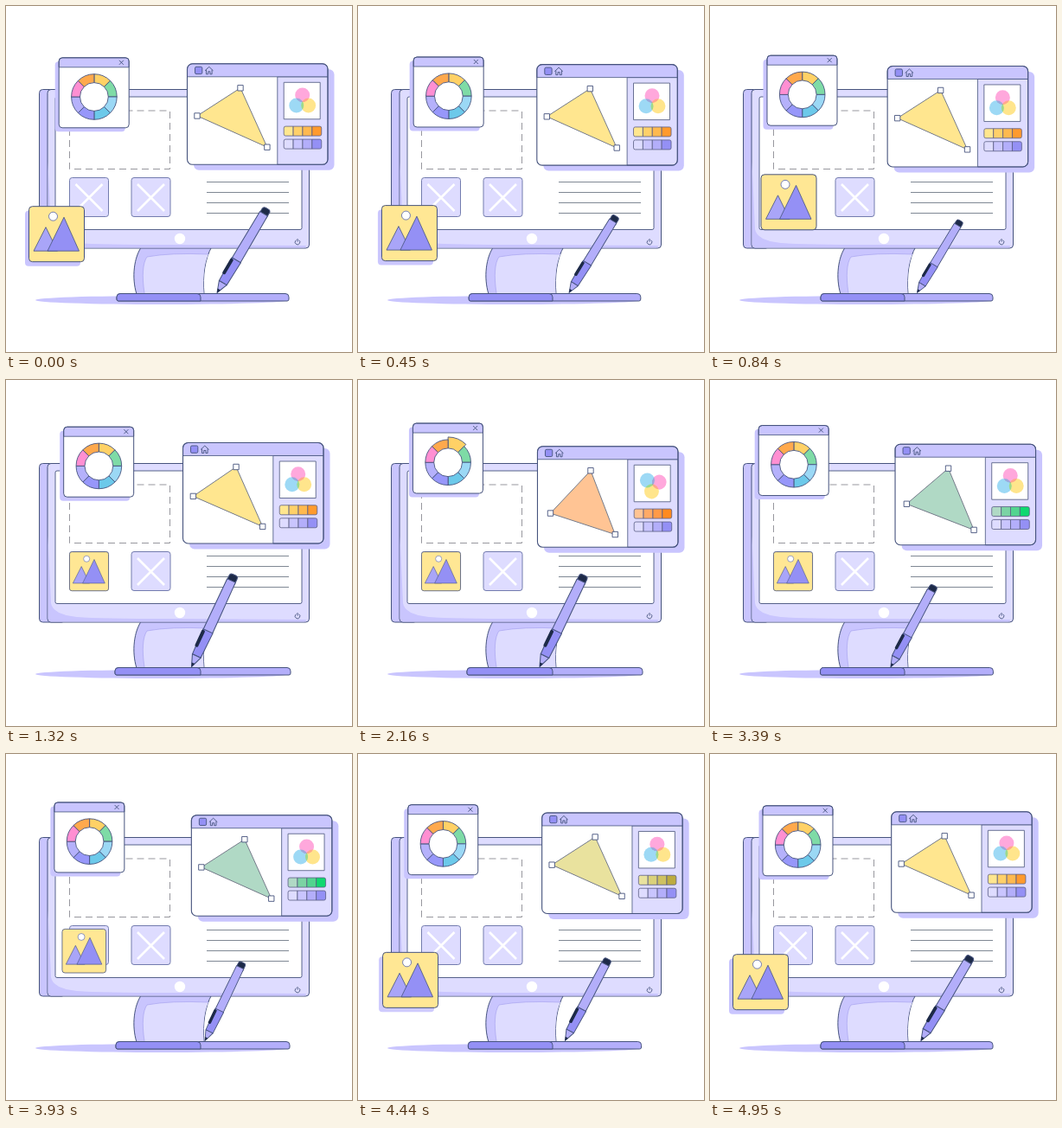
An HTML page with a canvas for the animation above (4.98 s loop, 400 px wide and 400 px high).

```html
<!DOCTYPE html>
<html lang="en">
<head>
<meta charset="utf-8">
<title>Design workspace</title>
<style>
html, body { margin: 0; width: 100%; height: 100%; overflow: hidden; background: #fff; }
canvas { display: block; width: 400px; height: 400px; }
</style>
</head>
<body>
<canvas id="stage" width="400" height="400"></canvas>
<script>
const c = document.getElementById('stage').getContext('2d');
const LOOP = 4980;
const INK = '#46537d', DARK = '#1d2a48';
const PALE = '#dedcff', LILAC = '#c9c5fe', MID = '#b3aefa', DEEP = '#9490f5';
const YELLOW = ['#ffe68f', '#ffd069', '#ffb94f', '#ff9a2e'];
const ORANGE = ['#ffc494', '#ffaa66', '#ff9a48', '#ff8a1f'];
const GREEN = ['#b0d9c5', '#7bd3a4', '#52d48f', '#10d870'];
const BLUES = [PALE, LILAC, MID, DEEP];
const WHEEL = ['#ffd166', '#7edba6', '#9bd8f5', '#6cc9ea', '#9797fa', '#b5b1fb', '#ff8fd2', '#ffa94d'];

const lerp = (a, b, k) => a + (b - a) * k;
const ease = (t, from, to) => {
  const k = Math.min(1, Math.max(0, (t - from) / (to - from)));
  return (1 - Math.cos(Math.PI * k)) / 2;
};
// 0 -> 1 -> 0 around a centre time
const pulse = (t, mid, half) => Math.abs(t - mid) < half ? Math.cos((t - mid) / half * Math.PI / 2) ** 2 : 0;
const mix = (a, b, k) => {
  const part = (s, i) => parseInt(s.slice(i, i + 2), 16);
  return '#' + [1, 3, 5].map(i =>
    Math.round(lerp(part(a, i), part(b, i), k)).toString(16).padStart(2, '0')).join('');
};

// smooth periodic curve through keys [time, ...values]
function track(keys, t) {
  const n = keys.length;
  let i = n - 1;
  while (keys[i][0] > t) i--;
  const end = i + 1 < n ? keys[i + 1][0] : LOOP;
  const k = (t - keys[i][0]) / (end - keys[i][0]);
  const [p, a, b, q] = [-1, 0, 1, 2].map(d => keys[(i + d + n) % n]);
  return a.slice(1).map((v, j) => {
    const p0 = p[j + 1], p2 = b[j + 1], p3 = q[j + 1];
    return v + k / 2 * (p2 - p0 + k * (2 * p0 - 5 * v + 4 * p2 - p3 + k * (3 * (v - p2) + p3 - p0)));
  });
}

function paint(fill, stroke, width = 1) {
  if (fill) { c.fillStyle = fill; c.fill(); }
  if (stroke) { c.strokeStyle = stroke; c.lineWidth = width; c.stroke(); }
}
function box(x, y, w, h, r, fill, stroke, width) {
  c.beginPath(); c.roundRect(x, y, w, h, r); paint(fill, stroke, width);
}
function disc(x, y, r, fill, stroke) {
  c.beginPath(); c.arc(x, y, r, 0, 7); paint(fill, stroke);
}
function poly(points, fill, stroke, width) {
  c.beginPath(); points.forEach(p => c.lineTo(...p)); c.closePath(); paint(fill, stroke, width);
}
function shape(d, fill, stroke, width = 1) {
  const p = new Path2D(d);
  if (fill) { c.fillStyle = fill; c.fill(p); }
  if (stroke) { c.strokeStyle = stroke; c.lineWidth = width; c.stroke(p); }
}
function at(x, y, draw, angle = 0, scale = 1) {
  c.save(); c.translate(x, y); c.rotate(angle); c.scale(scale, scale); draw(); c.restore();
}

function stand() {
  c.beginPath(); c.ellipse(180, 340, 146, 5, 0, 0, 7); paint(LILAC);
  shape('M157 278C148 290 145 314 151 333H229C227 312 230 292 238 278Z', LILAC, INK);
  shape('M160 332C157 312 158 297 163 290Q190 285 234 287C228 300 228 316 228.5 332Z', PALE);
  shape('M160 332C157 312 158 297 163 290Q190 285 234 287', null, '#a9a5f0', .7);
}

function monitor() {
  box(38.5, 96.5, 30, 183.5, 4, LILAC, INK);
  box(48, 96.5, 302.5, 183.5, 4, PALE, INK);
  shape('M48.5 180L52 258Q54 271 82 274Q110 276 190 276L346 277Q349 278 345 279.5H52Q48.5 279.5 48.5 275Z', LILAC);
  box(57, 105, 285, 153.5, 2, '#fff', INK, .9);
  disc(201, 269, 6.2, '#fff');
  c.beginPath(); c.arc(337, 273, 2.8, -1, 4.14);
  c.moveTo(337, 269); c.lineTo(337, 272.5); paint(null, INK, .9);

  c.setLineDash([8, 5]);
  box(73.5, 121, 116, 67.5, 0, null, '#97979e');
  c.setLineDash([]);
  for (const x of [73.5, 145]) {
    box(x, 198.5, 45, 45, 3, PALE, '#737cae');
    shape(`M${x + 7} 206l31 31m0-31l-31 31`, null, '#fff', 2.6);
  }
  for (let i = 0; i < 4; i++) shape(`M232 ${203.5 + 12 * i}H327`, null, '#7f8894');
}

function picture(t) {
  const home = t < 2500 ? 1 - ease(t, 390, 980) : ease(t, 3710, 4570);
  const size = t < 2500 ? 1 - ease(t, 860, 1270) : ease(t, 3690, 4350);
  at(lerp(96, 58.5, home), lerp(221.2, 263.7, home), () => {
    c.globalAlpha = Math.max(0, home * 2 - 1);
    box(-36.5, -27, 64, 64, 4, LILAC);
    c.globalAlpha = 1;
    box(-32, -32, 64, 64, 4, '#ffe794', INK);
    disc(-4, -20.5, 5, '#fff', '#737cae');
    poly([[-26.5, 19.5], [-12.5, -8], [1, 19.5]], '#a9a5f8', INK, .8);
    poly([[-10.5, 19.5], [8.5, -19.5], [26, 19.5]], DEEP, INK, .8);
  }, 0, lerp(.705, 1, size));
}

function pen(t) {
  const [x, y, tilt, scale] = track([
    [0, 244, 331.5, 30.6, 1.02], [840, 239.5, 331.5, 30.9, .875], [1320, 214.5, 331.5, 24.8, 1.055],
    [2160, 210, 331.5, 25.8, 1.06], [2880, 193, 332, 30.3, 1.03], [3930, 230, 331.5, 25.6, .905]
  ], t);
  at(x, y, () => {
    box(-4.5, -111, 9.5, 12, 3, DARK, INK);
    poly([[-5.5, -42], [-5, -104], [5, -104], [5.5, -42]], MID, INK);
    poly([[-5, -13], [-5.8, -43], [5.8, -43], [5, -13]], DEEP, INK);
    box(-6.6, -42, 3.8, 20, 1.5, DARK);
    poly([[0, 0], [-5, -13], [5, -13]], MID, INK);
    poly([[0, 0], [-1.8, -4.5], [1.8, -4.5]], DARK);
  }, tilt * Math.PI / 180, scale);
}

function base(t) {
  const [grow] = track([[0, 0], [840, 0], [1320, 2], [2160, 2], [2880, 0], [3930, 1]], t);
  const left = 128 - grow, right = 327 + grow;
  box(left, 332.5, right - left, 8.5, [4, 4, 2, 2], MID, INK);
  box(left, 332.5, 225 - left, 8.5, [4, 4, 0, 2], DEEP, INK);
}

function wheelWindow(t, sin, cos) {
  at(61.2 + 5.5 * sin, 54.7 + 5.1 * cos, () => {
    box(-4.5, 4.5, 81, 81, 4, LILAC);
    box(0, 0, 81, 81, 4, '#fff');
    box(0, 0, 81, 11, [4, 4, 0, 0], LILAC, INK, .8);
    box(0, 0, 81, 81, 4, null, INK);
    shape('M69.7 3l5 5m0-5l-5 5', null, INK, .9);
    const pops = [pulse(t, 2160, 240), pulse(t, 2560, 240), 0, 0, 0, 0, 0, pulse(t, 1760, 240)];
    WHEEL.forEach((color, i) => {
      const a = (i - 2) * Math.PI / 4, b = a + Math.PI / 4;
      c.beginPath();
      c.arc(40.7, 45.2, 26.3 + 3 * pops[i], a, b);
      c.arc(40.7, 45.2, 16.4, b, a, true);
      c.closePath(); paint(color, INK, .9);
    });
  });
}

function swatches(y, colors) {
  colors.forEach((color, i) => box(111.7 + i * 10.88, y, 10.88, 11,
    i === 0 ? [2, 0, 0, 2] : i === 3 ? [0, 2, 2, 0] : 0, color, '#5b5f83', .8));
}

function editorWindow(t, sin, cos) {
  const toOrange = ease(t, 1850, 2100), toGreen = ease(t, 2400, 2700), toYellow = ease(t, 4150, 4600);
  const palette = YELLOW.map((y, i) =>
    mix(mix(mix(y, ORANGE[i], toOrange), GREEN[i], toGreen), y, toYellow));
  const bend = t < 2500 ? ease(t, 1150, 1980) : 1 - ease(t, 3000, 3800);
  const corners = [[61.5, 28], [lerp(11.5, 15, bend), lerp(60.2, 77.3, bend)],
    [lerp(92.4, 89.8, bend), lerp(96.4, 101.8, bend)]];

  at(209.5 - 5 * sin, 72 - 5.2 * cos, () => {
    box(7.5, 6.5, 162.5, 116.5, 6, LILAC);
    box(0, 0, 162.5, 116.5, 6, '#fff');
    box(104.3, 15, 58.2, 101.5, [0, 0, 6, 0], PALE, INK, .8);
    box(0, 0, 162.5, 15, [6, 6, 0, 0], LILAC, INK, .8);
    box(0, 0, 162.5, 116.5, 6, null, INK, 1.1);
    box(9, 3.5, 8.3, 8.3, 1.5, DEEP, INK, .9);
    shape('M20.5 8L25.3 3.5L30 8M22 7V12H24.2V9H26.4V12H28.6V7', null, INK, .9);

    poly(corners, palette[0], '#757b8a');
    corners.forEach(([x, y]) => box(x - 3.2, y - 3.2, 6.4, 6.4, 0, '#fff', INK, .9));

    box(111.7, 21.5, 42, 42.5, 0, '#fff', '#5b6488', .9);
    at(133.2, 44.2, () => {
      c.globalCompositeOperation = 'darken';
      ['#ffa8dc', '#ffe58c', '#9dd9f5'].forEach((color, i) => {
        const a = -Math.PI / 2 + i * Math.PI * 2 / 3;
        disc(8 * Math.cos(a), 8 * Math.sin(a), 8.5, color);
      });
    }, 2 * Math.PI * ease(t, 1900, 2800));
    swatches(72.3, palette);
    swatches(87.3, BLUES);
  });
}

const start = performance.now();
function frame() {
  const t = Math.floor((performance.now() - start) % LOOP / 30) * 30;
  const turn = t / LOOP * 2 * Math.PI, sin = Math.sin(turn), cos = Math.cos(turn);
  c.fillStyle = '#fff';
  c.fillRect(0, 0, 400, 400);
  c.lineJoin = 'round';
  stand();
  monitor();
  picture(t);
  base(t);
  pen(t);
  wheelWindow(t, sin, cos);
  editorWindow(t, sin, cos);
  requestAnimationFrame(frame);
}
frame();
</script>
</body>
</html>
```
